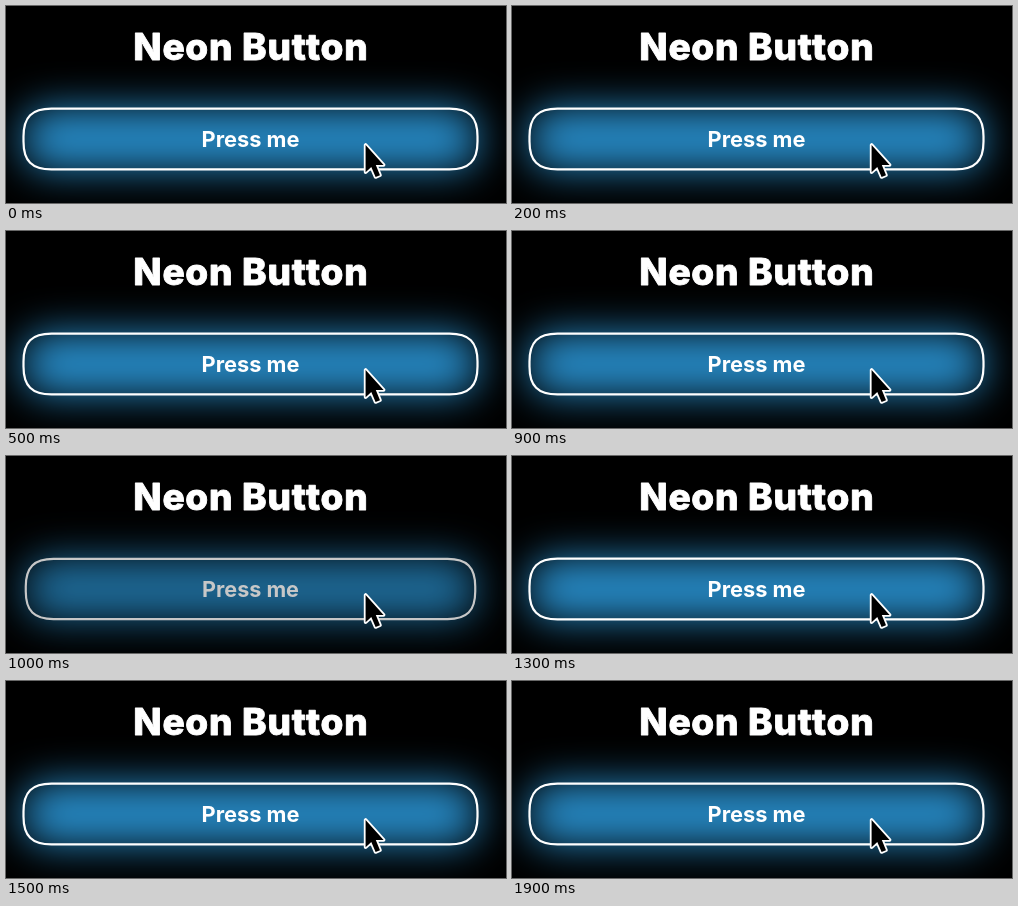
Write an HTML page with a canvas that moves like this. It is 500 by 197 pixels and loops after 2000 ms.

```html
<!DOCTYPE html>
<html lang="en">
<head>
<meta charset="utf-8">
<title>Neon Button</title>
<style>
  html, body { margin: 0; width: 100%; height: 100%; overflow: hidden; background: #000; }
  canvas { display: block; width: 500px; height: 197px; }
</style>
</head>
<body>
<canvas id="stage" width="500" height="197"></canvas>
<script>
const ctx = document.getElementById('stage').getContext('2d');
const W = 500, H = 197, LOOP = 2000, STEP = 100;
const CX = 244.5, CY = 133;

// Rounded rectangle with continuous (squircle-like) corners.
function squircle(x, y, w, h, e, k) {
  const c = e * (1 - k), r = x + w, b = y + h;
  const p = new Path2D();
  p.moveTo(x + e, y);
  p.lineTo(r - e, y);
  p.bezierCurveTo(r - c, y, r, y + c, r, y + e);
  p.lineTo(r, b - e);
  p.bezierCurveTo(r, b - c, r - c, b, r - e, b);
  p.lineTo(x + e, b);
  p.bezierCurveTo(x + c, b, x, b - c, x, b - e);
  p.lineTo(x, y + e);
  p.bezierCurveTo(x, y + c, x + c, y, x + e, y);
  p.closePath();
  return p;
}

const shape = squircle(17.5, 102.6, 454, 60.8, 28, 0.7);
const arrow = new Path2D('M359.6 139V166.3L365.3 161L369.6 171L374 169.2L369.8 159H377.6Z');

function drawGlow() {
  ctx.save();
  ctx.filter = 'blur(20px)';
  ctx.fillStyle = '#278bc7';
  ctx.fill(shape);
  ctx.restore();
}

function label(text, font, x, y, spacing, weight) {
  ctx.font = `${font} Inter, "Liberation Sans", sans-serif`;
  ctx.letterSpacing = `${spacing}px`;
  ctx.textAlign = 'center';
  ctx.lineJoin = 'round';
  ctx.lineWidth = weight;
  ctx.fillStyle = ctx.strokeStyle = '#fff';
  ctx.fillText(text, x, y);
  if (weight) ctx.strokeText(text, x, y);
}

function drawButton(scale, dim) {
  ctx.save();
  ctx.translate(CX, CY);
  ctx.scale(scale, scale);
  ctx.translate(-CX, -CY);
  drawGlow();
  ctx.strokeStyle = '#fff';
  ctx.lineWidth = 2.2;
  ctx.stroke(shape);
  label('Press me', '700 21.8px', CX, 141, 0, 0);
  ctx.restore();
  ctx.fillStyle = `rgba(0,0,0,${dim})`;
  ctx.fillRect(0, 0, W, H);
}

function drawCursor() {
  ctx.save();
  ctx.lineJoin = 'round';
  ctx.strokeStyle = '#fff';
  ctx.lineWidth = 3.6;
  ctx.stroke(arrow);
  ctx.restore();
  ctx.fillStyle = '#000';
  ctx.fill(arrow);
}

// Six quick clicks, then a faint settle.
function pose(t) {
  const n = Math.floor(t / STEP);
  if (n >= 4 && n < 15 && n % 2 === 0) return [0.99, 0.22];
  if (n > 15 && n < 19) return [1 + 0.0005 * (19 - n), 0];
  return [1, 0];
}

function frame() {
  const [scale, dim] = pose(performance.now() % LOOP);
  ctx.fillStyle = '#000';
  ctx.fillRect(0, 0, W, H);
  drawButton(scale, dim);
  label('Neon Button', '800 37px', 244.9, 54.4, 0.75, 0.9);
  drawCursor();
  requestAnimationFrame(frame);
}
frame();
</script>
</body>
</html>
```
